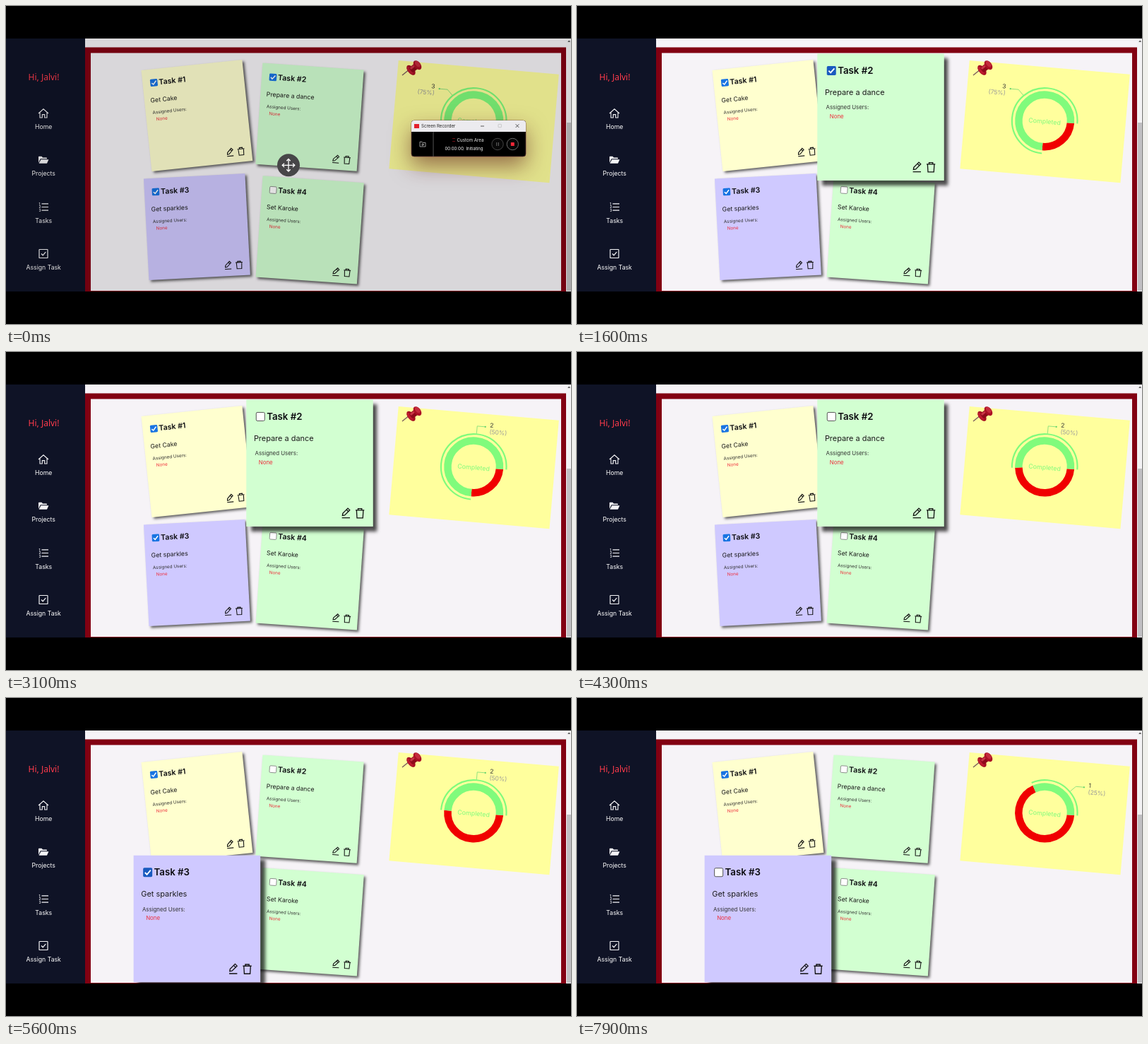
Animation, 800 px wide and 450 px high, one loop 8 s. Source, as an HTML page with a canvas:

```html
<!DOCTYPE html>
<html lang="en">
<head>
<meta charset="utf-8">
<title>Task board</title>
<style>
html, body { margin: 0; width: 100%; height: 100%; overflow: hidden; background: #000; }
canvas { display: block; width: 800px; height: 450px; }
</style>
</head>
<body>
<canvas id="stage" width="800" height="450"></canvas>
<script>
const ctx = document.getElementById('stage').getContext('2d');
const LOOP = 8000, STEP = 100, RAD = Math.PI / 180;
const SANS = 'Inter, "Open Sans", sans-serif';
const GREEN = '#80fb7c', RED = '#f00000', INK = '#1c1c1c';
const SIZE = 143.6;

const cards = [
  { x: 270.4, y: 155, tilt: -6, fill: '#ffffcf', title: 'Task #1', name: 'Get Cake', on: 4750, off: 5250, done: true },
  { x: 430, y: 157.2, tilt: 4, fill: '#d2ffd1', title: 'Task #2', name: 'Prepare a dance', on: 950, off: 4750, done: true, over: 1400, undo: 2000 },
  { x: 270.4, y: 312.5, tilt: -3, fill: '#cfc9ff', title: 'Task #3', name: 'Get sparkles', on: 5250, off: 9000, done: true, over: 5500, undo: 6000 },
  { x: 430.2, y: 316.8, tilt: 4, fill: '#d2ffd1', title: 'Task #4', name: 'Set Karoke', on: 9000, off: 9200, done: false }
];

const clamp = v => Math.max(0, Math.min(1, v));
const mix = (a, b, k) => a + (b - a) * k;

// cubic-bezier(.25, .1, .25, 1)
function ease(p) {
  let lo = 0, hi = 1;
  for (let i = 0; i < 24; i++) {
    const u = (lo + hi) / 2, v = 1 - u;
    if (0.75 * u * v * v + 0.75 * u * u * v + u * u * u < p) lo = u; else hi = u;
  }
  const u = lo, v = 1 - u;
  return 0.3 * u * v * v + 3 * u * u * v + u * u * u;
}

function rect(x, y, w, h, fill) {
  ctx.fillStyle = fill;
  ctx.fillRect(x, y, w, h);
}

function round(x, y, w, h, r, fill, stroke, lw = 1) {
  ctx.beginPath();
  ctx.roundRect(x, y, w, h, r);
  paint(fill, stroke, lw);
}

function paint(fill, stroke, lw = 1) {
  if (fill) { ctx.fillStyle = fill; ctx.fill(); }
  if (stroke) { ctx.strokeStyle = stroke; ctx.lineWidth = lw; ctx.stroke(); }
}

function shape(d, fill, stroke, lw) {
  const p = new Path2D(d);
  if (fill) { ctx.fillStyle = fill; ctx.fill(p); }
  if (stroke) { ctx.strokeStyle = stroke; ctx.lineWidth = lw || 1; ctx.stroke(p); }
}

function disc(x, y, r, fill, stroke, lw) {
  ctx.beginPath();
  ctx.arc(x, y, r, 0, 7);
  paint(fill, stroke, lw);
}

function text(s, x, y, size, fill, weight = 400, align = 'left', font = SANS) {
  ctx.font = `${weight} ${size}px ${font}`;
  ctx.textAlign = align;
  ctx.fillStyle = fill;
  ctx.fillText(s, x, y);
}

function at(x, y, turn, draw, scale = 1) {
  ctx.save();
  ctx.translate(x, y);
  ctx.rotate(turn * RAD);
  ctx.scale(scale, scale);
  draw();
  ctx.restore();
}

function sidebar() {
  rect(0, 46, 112, 358, '#0f1326');
  text('Hi, Jalvi!', 53.5, 105, 12, '#ff3b4b', 400, 'center', '"Noto Sans", sans-serif');
  const w = '#f4f4f6';
  at(53, 152, 0, () => shape('M-7 0L0 -6.2L7 0M-5 -1.5V6H-1.7V1.6H1.7V6H5V-1.5', null, w, 1.1));
  at(53, 218, 0, () => shape('M-7 4V-4.5Q-7 -5.2 -6.2 -5.2H-2.5L-1 -3.6H4Q5 -3.6 5 -2.6V-1.8H-3.6Q-4.4 -1.8 -4.8 -1ZM-3.6 -.8H7.4L5.2 4.2Q4.8 4.8 4.2 4.8H-6.4Z', w));
  at(53, 284.5, 0, () => {
    shape('M-2.5 -4.6H7M-2.5 0H7M-2.5 4.6H7', null, w, 1.2);
    ['1', '2', '3'].forEach((n, i) => text(n, -6.6, -3 + i * 4.6, 4.6, w, 600));
  });
  at(53, 350.5, 0, () => {
    round(-6, -6, 12, 12, 0.6, null, w, 1.2);
    shape('M-3 0L-.8 2.3L3.2 -2.4', null, w, 1.3);
  });
  ['Home', 'Projects', 'Tasks', 'Assign Task'].forEach((s, i) =>
    text(s, 53.2, 174.2 + i * 66.2, 8.7, '#fff', 400, 'center'));
}

function board() {
  rect(112, 46, 688, 358, '#f6f3f7');
  rect(112, 58.5, 681, 345.5, '#820012');
  rect(120, 66.5, 666, 336.5, '#f6f3f7');
  rect(793, 46, 7, 358, '#f3f2f4');
  rect(794, 165, 6, 238, '#c0bfc2');
  shape('M795.2 51L797.2 48.6L799.2 51Z', '#555');
}

function checkbox(checked, over) {
  const x = 10.8, y = 14, s = 10.4;
  if (checked) {
    round(x, y, s, s, 1.4, over ? '#195abf' : '#1874e2');
    shape('M12.9 19.4L15.1 21.6L19.3 16.7', null, '#fff', 1.5);
  } else {
    round(x + .4, y + .4, s - .8, s - .8, 1.4, '#fff', over ? '#555' : '#777', 0.8);
  }
}

function card(c, t) {
  const k = clamp((t - c.on) / 150) - clamp((t - c.off) / 150);
  const turn = c.tilt * (1 - k), scale = mix(1, 1.25, k);
  at(c.x, c.y, turn, () => {
    const d = mix(2.7, 5.3, k) * scale, a = turn * RAD;
    const shade = Math.round(33 * (1 - k));
    ctx.save();
    ctx.shadowColor = `rgba(${shade},${shade},${shade},.7)`;
    ctx.shadowBlur = 3.8 * scale;
    ctx.shadowOffsetX = d * (Math.cos(a) - Math.sin(a));
    ctx.shadowOffsetY = d * (Math.cos(a) + Math.sin(a));
    rect(-SIZE / 2, -SIZE / 2, SIZE, SIZE, c.fill);
    ctx.restore();
    ctx.translate(-SIZE / 2, -SIZE / 2);
    checkbox(c.done && !(t >= c.undo), k > 0 && t >= c.over);
    text(c.title, 23.1, 22.7, 10.6, '#0c0c10', 600);
    text(c.name, 8.5, 46.7, 8.75, INK);
    text('Assigned Users:', 9.8, 63.2, 6.3, '#333');
    text('None', 14, 73, 6.3, '#ee2f3c');
    // pencil over a line, then a bin
    shape('M108.3 133.8H117.4M108.9 131.2L109.3 128.6L115 122.9L117.2 125.1L111.5 130.8ZM113.4 124.5L115.6 126.7', null, '#111', 1.05);
    shape('M123.8 125.2H133.6M126.6 125V123.4H130.8V125M124.9 125.4L125.4 134H132L132.5 125.4', null, '#111', 1.05);
  }, scale);
}

function spin(t) {
  const first = ease(clamp((t - 3300) / 1500));
  const second = ease(clamp((t - 7300) / 1500));
  return 270 - 90 * first - 90 * second;
}

function arc(r, w, from, to, color) {
  ctx.beginPath();
  ctx.arc(0, 0, r, -from * RAD, -to * RAD, true);
  paint(null, color, w);
}

function chart(t) {
  at(662.6, 163.6, 5, () => rect(-114, -77, 228, 154, '#ffff9d'));
  at(662.2, 162.4, 5, () => {
    const green = spin(t);
    arc(36.8, 10.5, green, 360, RED);
    arc(36.8, 10.5, 0, green, GREEN);
    arc(46.3, 2.2, 0, green, GREEN);
    text('Completed', 0, 4, 8.9, GREEN, 400, 'center');

    const left = t < 2900 ? 3 : t < 6900 ? 2 : 1;
    const mid = left * 45 * RAD, cos = Math.cos(mid), sin = -Math.sin(mid);
    const side = cos > -0.001 ? 1 : -1;
    const ex = 57.75 * cos + 11.5 * side, ey = 57.75 * sin;
    ctx.beginPath();
    ctx.moveTo(47.2 * cos, 47.2 * sin);
    ctx.lineTo(57.75 * cos, ey);
    ctx.lineTo(ex, ey);
    paint(null, '#79dc78', 0.8);
    disc(ex, ey, 1.1, '#5fd26a');
    const align = side > 0 ? 'left' : 'right', tx = ex + 6.3 * side;
    text(left, tx, ey, 8.5, '#333', 400, align);
    text(`(${left * 25}%)`, tx, ey + 9.5, 8.5, '#999', 400, align);
  });
}

function pin() {
  shape('M561 98L569 91.5', null, '#77585a', 1.3);
  at(577, 88, -38, () => {
    ctx.beginPath(); ctx.ellipse(-4.5, 0, 4.6, 8.2, 0, 0, 7); paint('#a40d20');
    ctx.beginPath(); ctx.ellipse(-5.6, -.6, 3, 6.4, 0, 0, 7); paint('#bd1b2e');
    round(-5, -4.4, 11, 8.8, 2, '#8f0a1a');
    round(-4, -3.6, 9, 3, 1.4, '#c93345');
    ctx.beginPath(); ctx.ellipse(7, 0, 4.6, 7.4, 0, 0, 7); paint('#ab1024');
    ctx.beginPath(); ctx.ellipse(8.2, -1.2, 2.9, 4.8, 0, 0, 7); paint('#c42a3c');
  });
}

function recorder() {
  ctx.save();
  ctx.shadowColor = 'rgba(90,20,20,.55)';
  ctx.shadowBlur = 30;
  ctx.shadowOffsetY = 13;
  round(574, 162, 162, 51, 4, '#000');
  ctx.restore();
  round(574, 162, 162, 51, 4, '#000', '#6b3a3a', 0.7);
  round(574, 162, 162, 16, [4, 4, 0, 0], '#ecebef');
  rect(578, 167, 7, 6, '#e3202c');
  text('Screen Recorder', 588, 172.3, 6.1, '#222');
  shape('M672 170H677M721.6 167.2L726.4 172M726.4 167.2L721.6 172', null, '#333', 0.8);
  round(697, 167.3, 4.4, 4.4, 0.6, null, '#bbb', 0.7);
  rect(604.5, 178, 1, 35, '#555');
  shape('M586 192.2H589L590 193.4H594V199H586ZM589.2 194.8L592 196.2L589.2 197.6Z', null, '#bbb', 0.8);
  shape('M632 187.5H636M632 191.5H636', null, '#7a1018', 0.9);
  text('Custom Area', 657.5, 192.3, 6.2, '#eee', 400, 'center');
  text('00:00:00', 621.5, 204.4, 6, '#f4f4f4');
  rect(647.5, 199.5, 0.7, 5, '#777');
  text('Initiating', 651.5, 204.4, 6, '#f4f4f4');
  disc(696, 195.5, 8.2, '#080808', '#4d4d4d', 0.9);
  shape('M694.8 193V198M697.4 193V198', null, '#777', 0.9);
  disc(717.3, 195.5, 8.2, '#080808', '#777', 0.9);
  round(714.8, 193, 5, 5, 0.6, '#ee2737');
}

function moveHandle() {
  disc(400, 225.3, 16, '#474648');
  at(400, 225.3, 0, () => {
    for (let i = 0; i < 4; i++) {
      shape('M0 0V-8.6M-2.7 -6L0 -8.8L2.7 -6', null, '#fff', 1.3);
      ctx.rotate(Math.PI / 2);
    }
  });
}

function draw(t) {
  rect(0, 0, 800, 450, '#000');
  ctx.save();
  ctx.beginPath();
  ctx.rect(0, 46, 800, 358);
  ctx.clip();
  board();
  chart(t);
  pin();
  const lifted = c => t >= c.on && t < c.off;
  cards.filter(c => !lifted(c)).forEach(c => card(c, t));
  cards.filter(lifted).forEach(c => card(c, t));
  sidebar();
  if (t < 300) rect(0, 46, 800, 358, 'rgba(0,0,0,.117)');
  ctx.restore();
  if (t < 100) {
    recorder();
    moveHandle();
  }
}

const start = performance.now();
function frame() {
  const t = (performance.now() - start) % LOOP;
  draw(Math.floor(t / STEP) * STEP);
  requestAnimationFrame(frame);
}
frame();
</script>
</body>
</html>
```
